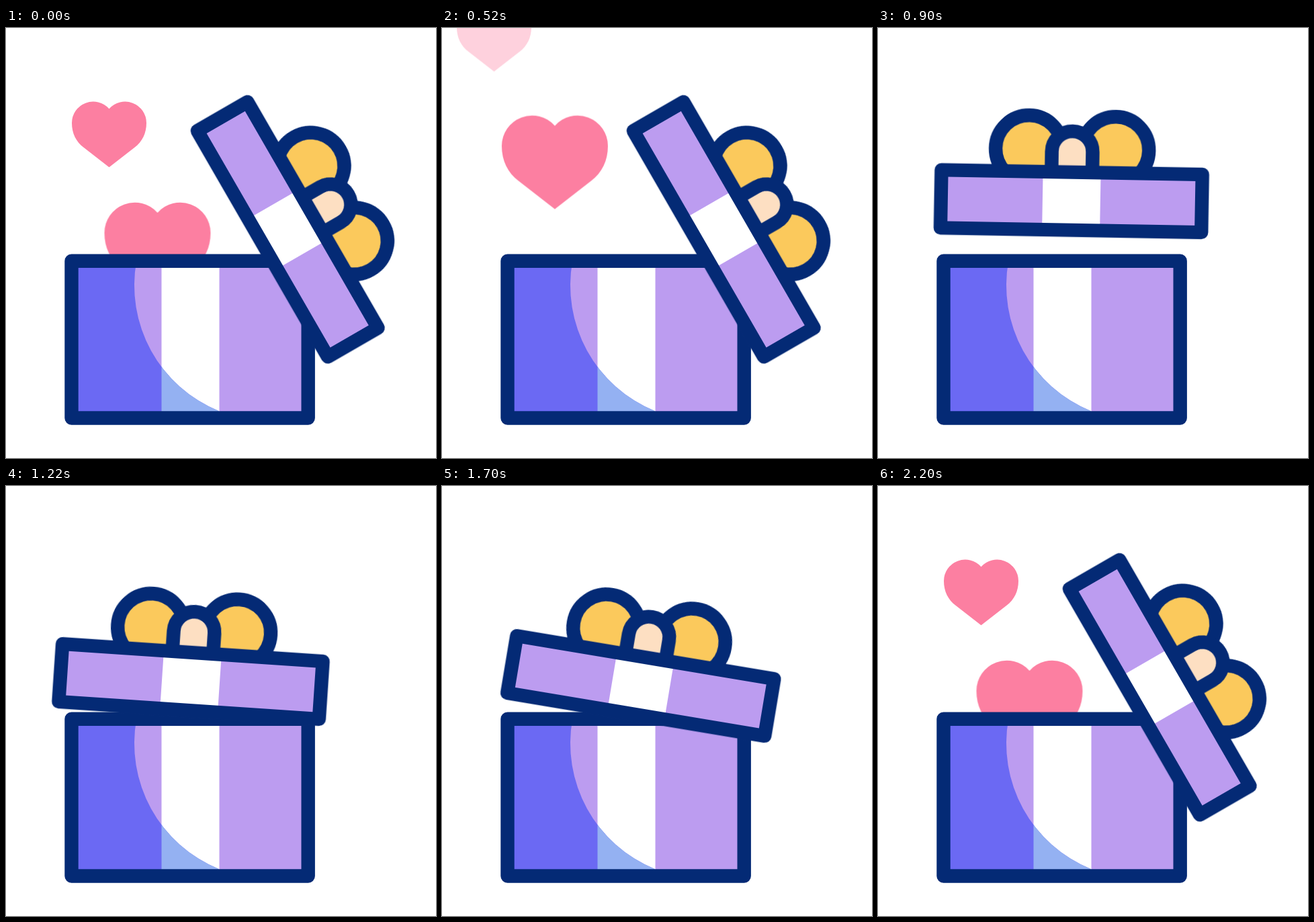
These frames come from a looping animation (640 by 640 pixels, 2400 ms). An HTML page:

```html
<!DOCTYPE html>
<html lang="en">
<head>
<meta charset="utf-8">
<title>Gift box</title>
<style>
  html, body { margin: 0; width: 100%; height: 100%; overflow: hidden; background: #fff; }
  svg { display: block; width: 100%; height: 100%; }

  .line { stroke: #042a75; stroke-width: 20.4; stroke-linejoin: round; }
  .none { fill: none; }
  .lilac { fill: #bc9cf0; }
  .white { fill: #fff; }
  .gold { fill: #fbc95c; }
  .peach { fill: #fddfc2; }
  .heart { fill: #fc7fa1; }

  .lid, .big, .small, .heart { animation: 2400ms linear infinite; }
  .lid { animation-name: lid; }
  .big { animation-name: big; }
  .small { animation-name: small; }
  .big .heart { animation-name: big-fade; }
  .small .heart { animation-name: small-fade; }

  /* close, drop, rock on the right edge, then swing open */
  @keyframes lid {
    0% { transform: translate(419.2px, 299.7px) rotate(60deg); }
    25.833% { transform: translate(419.2px, 299.7px) rotate(60deg); animation-timing-function: cubic-bezier(.6, 0, .5, .9); }
    37.5% { transform: translate(287.9px, 257.6px) rotate(1deg); animation-timing-function: cubic-bezier(.4, .1, .9, .7); }
    41.667% { transform: translate(271.5px, 303.7px) rotate(0deg); animation-timing-function: cubic-bezier(.2, .5, .6, 1); }
    50.833% { transform: translate(275px, 291px) rotate(3.84deg); animation-timing-function: cubic-bezier(.4, 0, .8, .6); }
    58.333%, 60% { transform: translate(271.5px, 303.7px) rotate(0deg); animation-timing-function: cubic-bezier(.7, 0, .84, .3); }
    70.833% { transform: translate(295.3px, 297.6px) rotate(9.3deg); animation-timing-function: cubic-bezier(.33, .3, .6, .75); }
    78.333% { transform: translate(387px, 295px) rotate(46.7deg); animation-timing-function: cubic-bezier(.16, .5, .4, 1); }
    91.667%, 100% { transform: translate(419.2px, 299.7px) rotate(60deg); }
  }

  @keyframes big {
    0% { transform: translate(225.5px, 259px); }
    5% { transform: translate(225.5px, 259px); animation-timing-function: cubic-bezier(.5, 0, .85, .75); }
    21.667% { transform: translate(168px, 130px); }
    36.667% { transform: translate(132px, -40px); animation-timing-function: step-start; }
    36.7% { transform: translate(228px, 350px); }
    79.167% { transform: translate(228px, 350px); animation-timing-function: cubic-bezier(.3, .3, .6, 1); }
    91.667%, 100% { transform: translate(225.5px, 259px); }
  }
  @keyframes big-fade {
    0%, 28.333% { opacity: 1; }
    36.667%, 70% { opacity: 0; }
    70.01%, 100% { opacity: 1; }
  }

  @keyframes small {
    0% { transform: translate(153.5px, 109px) scale(.7025); }
    5% { transform: translate(153.5px, 109px) scale(.7025); animation-timing-function: cubic-bezier(.5, 0, .8, .8); }
    21.667% { transform: translate(77.5px, -33px) scale(.7025); }
    25% { transform: translate(77px, -70px) scale(.7025); animation-timing-function: step-start; }
    25.03% { transform: translate(157px, 345px) scale(.7025); }
    71.667% { transform: translate(157px, 345px) scale(.7025); animation-timing-function: cubic-bezier(.4, 0, .8, .75); }
    78.333% { transform: translate(156.5px, 253px) scale(.7025); animation-timing-function: cubic-bezier(.3, .48, .6, 1); }
    91.667%, 100% { transform: translate(153.5px, 109px) scale(.7025); }
  }
  @keyframes small-fade {
    0%, 15.833% { opacity: 1; }
    25%, 70% { opacity: 0; }
    70.01%, 100% { opacity: 1; }
  }
</style>
</head>
<body>
<svg viewBox="0 0 640 640">
  <defs>
    <path id="heart" d="M0 16A45.2 45.2 0 0 0-79 46C-79 68-70 86-54 98L0 140L54 98C70 86 79 68 79 46A45.2 45.2 0 0 0 0 16Z"/>
    <!-- left of a large circle, down to the box floor -->
    <path id="shade" d="M97 347H194.2A202 202 0 0 0 316.6 570V580H97Z"/>
    <clipPath id="ribbon"><path d="M231.5 347H317.5V580H231.5Z"/></clipPath>
  </defs>

  <g class="small"><use href="#heart" class="heart"/></g>
  <g class="big"><use href="#heart" class="heart"/></g>

  <g>
    <path class="lilac" d="M97.5 346.8H449.7V580.5H97.5Z"/>
    <path class="white" d="M231.5 346.8H317.5V580.5H231.5Z"/>
    <use href="#shade" fill="#6b69f3"/>
    <use href="#shade" fill="#94b1f2" clip-path="url(#ribbon)"/>
    <path class="line none" d="M97.5 346.8H449.7V580.5H97.5Z"/>
  </g>

  <g class="lid">
    <circle class="line gold" cx="-64.4" cy="-77" r="49.7"/>
    <circle class="line gold" cx="64.4" cy="-77" r="49.7"/>
    <path class="line peach" d="M-30.4-43V-73.6A30.4 30.4 0 0 1 30.4-73.6V-43"/>
    <path class="lilac" d="M-194.2-43.1H194.2V43.1H-194.2Z"/>
    <path class="white" d="M-43-43.1H43V43.1H-43Z"/>
    <path class="line none" d="M-194.2-43.1H194.2V43.1H-194.2Z"/>
  </g>
</svg>
</body>
</html>
```
